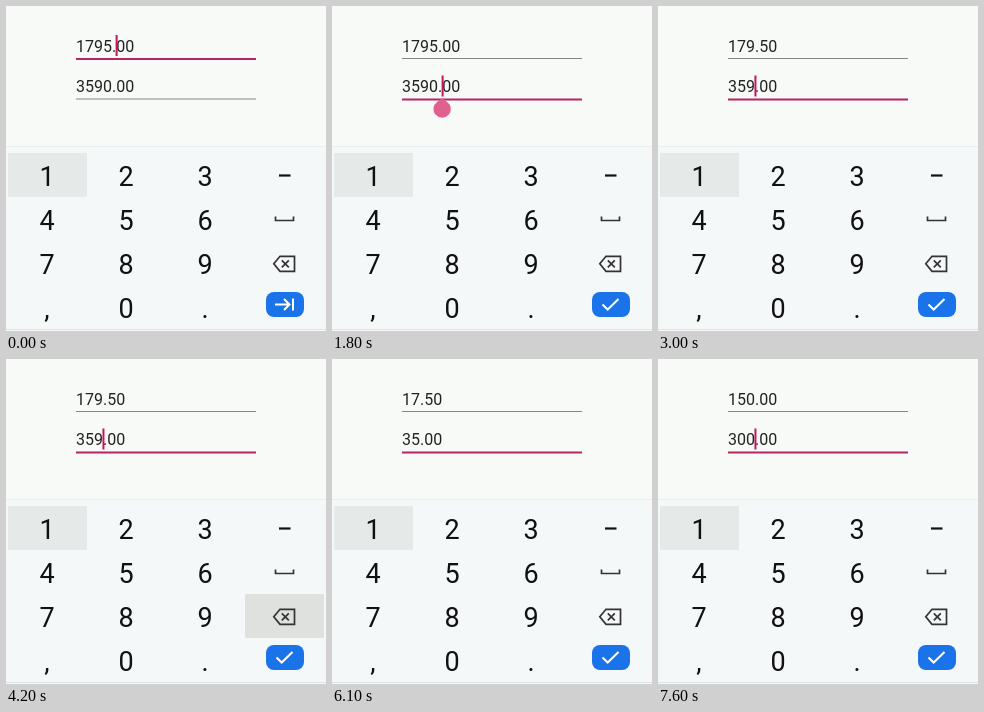
Animation of 320 by 325 pixels, one loop 8000 ms. Source, as an HTML page:

```html
<!DOCTYPE html>
<html lang="en">
<head>
<meta charset="utf-8">
<title>Linked amount fields</title>
<style>
  html, body { margin: 0; width: 100%; height: 100%; overflow: hidden; background: #f7faf6; }
  svg { display: block; width: 320px; height: 325px; font-family: Roboto, sans-serif; }
  .amount { font-size: 16px; fill: #222; }
  .keys { font-size: 27px; fill: #111; text-anchor: middle; }
  .icon { fill: none; stroke: #333; stroke-width: 1.7; }
  .white { fill: none; stroke: #fff; stroke-width: 2; }
</style>
</head>
<body>
<svg viewBox="0 0 320 325">
  <rect width="320" height="325" fill="#f7faf6"/>
  <rect y="140" width="320" height="183" fill="#f4f8f8"/>
  <path d="M0 140.5H320" stroke="#e9edeb"/>
  <path d="M0 323.5H320" stroke="#dce3e5"/>

  <text id="half" class="amount" x="70" y="46"></text>
  <text id="full" class="amount" x="70" y="86"></text>
  <rect id="halfLine" x="70" width="180"/>
  <rect id="fullLine" x="70" width="180"/>
  <rect id="cursor" width="2" height="21" fill="#c2185b"/>
  <path id="handle" d="M0 -11L5 -7.1A8.7 8.7 0 1 1 -5 -7.1Z" fill="#e0608f"/>

  <rect x="2" y="147" width="79" height="44" fill="#e5e9e8"/>
  <rect id="pressed" width="79" height="44" fill="#dfe1df"/>
  <g id="keys" class="keys"></g>

  <path d="M273 169.5H284.500" stroke="#111" stroke-width="2.2"/>
  <path class="icon" d="M269.500 210.500V214.500H287.500V210.500"/>
  <path class="icon" d="M274 250.300H288.500V265.300H274L267.800 257.800ZM275.800 254.300L282.800 261.300M282.800 254.300L275.800 261.300"/>
  <rect x="260" y="286" width="38" height="25" rx="8" fill="#1a73e8"/>
  <path id="tab" class="white" d="M269 298.500H283M278 293L283.500 298.500L278 304M287 292.500V304.500"/>
  <path id="check" class="white" d="M270.500 298.500L275.700 303.500L286.500 293"/>
</svg>
<script>
const $ = id => document.getElementById(id);
const DURATION = 8000;
const DIGIT = 8.98, POINT = 4.2;
const BACKSPACE = [239, 235], ZERO = [81, 279];

// Each step changes part of the state; caret counts characters in the focused field.
const steps = [
  [0, { half: "1795.00", full: "3590.00", focus: 0, caret: 5, blink: true, handle: false, key: null }],
  [600, { blink: false }],
  [1000, { focus: 1, caret: 7, blink: true, handle: true }],
  [1600, { caret: 5 }],
  [2000, { key: BACKSPACE, handle: false }],
  [2100, { blink: false }],
  [2300, { blink: true }],
  [2500, { caret: 4, key: null }],
  [2800, { key: BACKSPACE }],
  [3000, { half: "179.50", full: "359.00", caret: 3, key: null }],
  [3500, { blink: false }],
  [4000, { blink: true }],
  [4200, { key: BACKSPACE }],
  [4300, { half: "17.50", full: "35.00", caret: 2 }],
  [4400, { key: null }],
  [4900, { blink: false }],
  [5400, { blink: true }],
  [5900, { blink: false, key: BACKSPACE }],
  [6100, { key: null }],
  [6200, { half: "1.50", full: "3.00", caret: 1, blink: true }],
  [6700, { blink: false }],
  [7000, { key: ZERO }],
  [7200, { half: "15.00", full: "30.00", caret: 2, blink: true, key: null }],
  [7400, { key: ZERO }],
  [7500, { half: "150.00", full: "300.00", caret: 3 }],
  [7600, { key: null }]
];

["123", "456", "789", ",0."].forEach((row, r) => [...row].forEach((label, c) => {
  const text = document.createElementNS("http://www.w3.org/2000/svg", "text");
  text.setAttribute("x", 41 + 79 * c);
  text.setAttribute("y", 179.5 + 44 * r);
  text.textContent = label;
  $("keys").append(text);
}));

function set(id, attributes) {
  for (const name in attributes) $(id).setAttribute(name, attributes[name]);
}

const show = (id, visible) => set(id, { visibility: visible ? "visible" : "hidden" });

function underline(id, y, focused) {
  set(id, { y, height: focused ? 2 : 1, fill: focused ? "#b82564" : "#858886" });
}

function caretX(value, caret) {
  return [...value.slice(0, caret)].reduce((x, c) => x + (c === "." ? POINT : DIGIT), 70);
}

function render(time) {
  const state = Object.assign({}, ...steps.filter(([at]) => at <= time).map(([, change]) => change));
  const { half, full, focus, caret, blink, handle, key } = state;
  const x = caretX(focus ? full : half, caret);

  $("half").textContent = half;
  $("full").textContent = full;
  underline("halfLine", 52, focus === 0);
  underline("fullLine", 92.5, focus === 1);
  set("cursor", { x: x - 0.5, y: focus ? 69.5 : 29 });
  set("handle", { transform: `translate(${x} 103)` });
  show("cursor", blink);
  show("handle", handle);
  show("pressed", key);
  if (key) set("pressed", { x: key[0], y: key[1] });
  show("tab", focus === 0);
  show("check", focus === 1);
}

const start = performance.now();
function tick() {
  render((performance.now() - start) % DURATION);
  requestAnimationFrame(tick);
}
tick();
</script>
</body>
</html>
```
